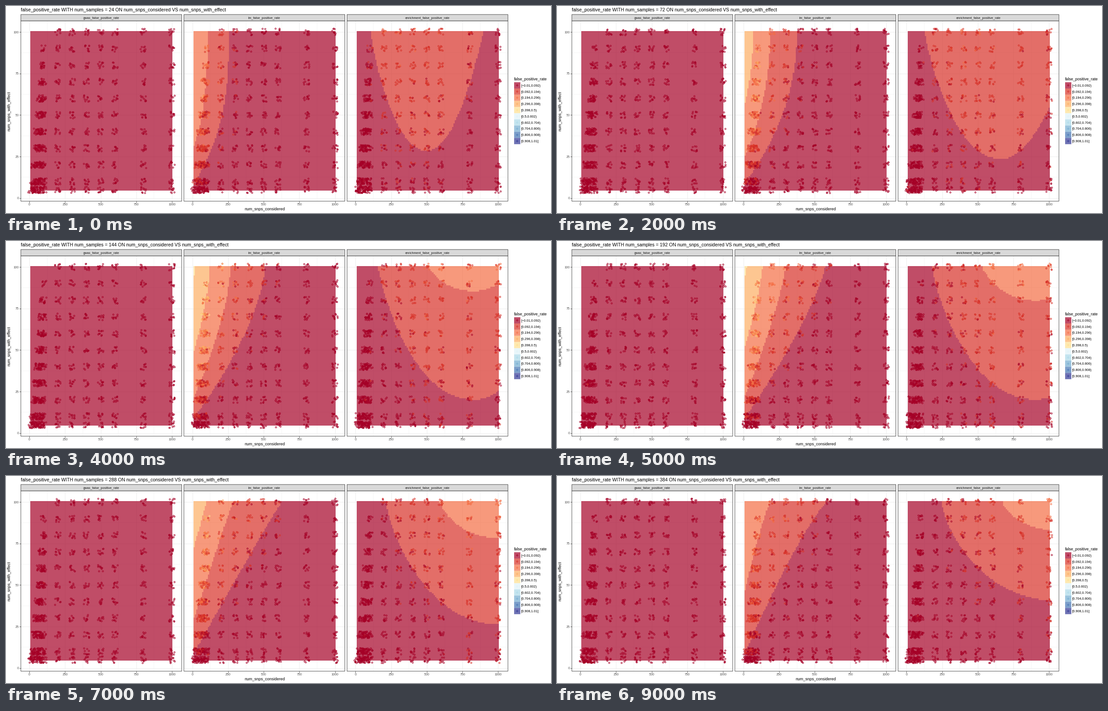
A matplotlib script for the animation above (10 s loop, 1212 by 462 pixels).

```python
import numpy as np
import matplotlib.pyplot as plt
from matplotlib.animation import FuncAnimation
from matplotlib.patches import Rectangle

W, H, DPI = 1212, 462, 100
PX = 72 / DPI
SAMPLES = (24, 48, 72, *range(96, 385, 48))
PANELS = ("gwas_false_positive_rate", "lm_false_positive_rate",
          "enrichment_false_positive_rate")
OFFSETS = 362.7 * np.arange(3)
COLORS = ("#A50026", "#D73027", "#F46D43", "#FDAE61", "#FEE090",
          "#E0F3F8", "#ABD9E9", "#74ADD1", "#4575B4", "#313695")
RGB = np.array([[int(c[i:i + 2], 16) / 255 for i in (1, 3, 5)] for c in COLORS])
BREAKS = -.01 + .102 * np.arange(11)
LEFT, RIGHT, TOP, BOTTOM, CELLS = 54.3, 369.5, 56.5, 412, 100


def px(v):
    return 52 + .317 * np.asarray(v)


def py(v):
    return 428.7 - 3.707 * np.asarray(v)


def hill(n, height, center, bend):
    return height - bend * (n - center) ** 2


def lm_edges(y, n):
    """Right edge of each level, highest rate first, at stage height y."""
    power = .65 + 2.5 * np.exp(-n / 140)
    sizes = ((hill(n, 5.5, 175, .0013), hill(n, 28, 150, .0045)),
             (hill(n, 40, 200, .0013), hill(n, 193, 150, .0045)),
             (hill(n, 93, 230, .00146), hill(n, 295, 160, .0018)),
             (hill(n, 197, 300, .00156), 340))
    v = np.maximum(y - TOP, 0)
    return np.array([417 + max(width, 0) * (1 - (v / max(drop, 28)) ** power)
                     for width, drop in sizes])


def bowl(x, n, start, deep):
    """Lower rim of a bowl that hangs from the top edge."""
    bottom = 1140 - 235 * np.exp(-n / 170)
    w = np.maximum(x - start, 0) / (bottom - start)
    side = np.where(w < 1, w ** (.87 - .00035 * n), w)
    return TOP + deep * (1 - (1 - side) ** 2) - 5 * np.maximum(start - x, 0)


def bowl_depths(x, y, n):
    """How far a place lies inside the outer and inner bowl."""
    outer = bowl(x, n, 807 + .15 * n - .00007 * n * n, hill(n, 299, 165, .0016))
    late = max(n - 110, 0)
    inner = bowl(x, n, 930 + .0004 * n * n, late ** .5 * (10.4 - .0235 * late))
    return np.array((outer - y, inner - y))


def levels(panel, n):
    mid = (np.arange(CELLS) + .5) / CELLS
    x, y = np.meshgrid(LEFT + OFFSETS[panel] + (RIGHT - LEFT) * mid,
                       TOP + (BOTTOM - TOP) * mid)
    if panel == 0:
        return np.zeros(x.shape, int)
    inside = x < lm_edges(y, n) if panel == 1 else bowl_depths(x, y, n) > 0
    return inside.sum(axis=0)


def rates(panel, n, xv, yv, rng):
    noise = rng.normal(size=len(xv))
    x, y = px(xv) + OFFSETS[panel], py(yv)
    if panel == 0:
        small = (xv < 70) & (yv > 15)
        return .025 + .018 * noise + .02 * small * min(1, n / 200)
    if panel == 1:
        edges = np.sort(lm_edges(y, n), axis=0)
        base = np.array([np.interp(p, (*e, e[-1] + 90), (.398, .296, .194, .092, .02))
                         for p, e in zip(x, edges.T)])
        base = np.where(yv < 8, .03, base)
        return base + (.012 + .2 * base) * noise
    outer, inner = bowl_depths(x, y, n)
    peak = min(1000, 200 + 2.2 * n)
    hump = .035 * np.exp(-((xv - peak) / 150) ** 2)
    base = .082 + .0003 * np.clip(outer, -220, 260) + .0008 * np.maximum(inner, 0)
    return base + hump + .028 * noise


fig = plt.figure(figsize=(W / DPI, H / DPI), dpi=DPI, facecolor="white")
ax = fig.add_axes((0, 0, 1, 1))
ax.axis("off")


def text(x, y, s, size, color="black", **kw):
    return ax.text(x, y, s, fontsize=size * PX, color=color,
                   family=["Liberation Sans", "DejaVu Sans"], **kw)


def line(x, y, color, width, z):
    ax.plot(x, y, color=color, lw=width * PX, zorder=z, solid_capstyle="butt")


def box(x, y, w, h, z, **kw):
    ax.add_patch(Rectangle((x, y), w, h, zorder=z, snap=False, **kw))


def rings(x, y, colors):
    return ax.scatter(x, y, s=(3.1 * PX) ** 2, facecolors="none",
                      edgecolors=colors, linewidths=PX, zorder=4)


def number(v):
    return f"{round(v, 3):g}".replace("-", "−")


images, points = [], []
for offset, name in zip(OFFSETS, PANELS):
    left, width = 33 + offset, 357.8
    for v in range(0, 1001, 125):
        major = v % 250 == 0
        x = px(v) + offset
        line((x, x), (33, 436), "#EBEBEB", .85 if major else .45, 1)
        if major:
            line((x, x), (436, 439), "#333333", .85, 5)
            text(x, 445.2, str(v), 7.1, "#4D4D4D", ha="center")
    for v in np.arange(0, 101, 12.5):
        line((left, left + width), (py(v), py(v)), "#EBEBEB",
             .85 if v % 25 == 0 else .45, 1)
    edge = dict(ec="#333333", lw=.85 * PX)
    box(left, 33.2, width, 402.5, 5, fc="none", **edge)
    box(left, 19, width, 14.2, 5, fc="#D9D9D9", **edge)
    text(left + width / 2, 29.2, name, 7.1, "#1A1A1A", ha="center", zorder=6)
    images.append(ax.imshow(np.zeros((CELLS, CELLS, 4)), aspect="auto", zorder=2,
                            interpolation="nearest",
                            extent=(LEFT + offset, RIGHT + offset, BOTTOM, TOP)))
    points.append(rings([], [], []))

for v in range(0, 101, 25):
    line((30.3, 33), (py(v), py(v)), "#333333", .85, 5)
    text(28.6, py(v) + 2.6, str(v), 7.1, "#4D4D4D", ha="right")

title = text(33, 12, "", 10.4)
text(575, 455.7, "num_snps_considered", 8.85, ha="center")
text(11.5, 234.5, "num_snps_with_effect", 8.85, ha="right", va="center", rotation=90)

text(1130, 166.3, "false_positive_rate", 8.8)
for i, color in enumerate(COLORS):
    y = 170.2 + 13.82 * i
    box(1130, y, 13.8, 13.82, 2, fc=color, alpha=.7, lw=0)
    rings([1136.9], [y + 6.9], color)
    close = "]" if i == len(COLORS) - 1 else ")"
    text(1145.5, y + 9.5, f"[{number(BREAKS[i])},{number(BREAKS[i + 1])}{close}", 7.35)

ax.set_xlim(0, W)
ax.set_ylim(H, 0)
ax.set_autoscale_on(False)

# Every pair with fewer effects than considered, ten repeats each.
CONSIDERED = (*range(10, 101, 10), *range(200, 601, 100), 800, 1000)
EFFECTS = (5, *range(10, 101, 10))
PAIRS = np.repeat([(c, e) for c in CONSIDERED for e in EFFECTS if e < c], 10, axis=0)
XV, YV = PAIRS.T


def draw(i):
    n = SAMPLES[i]
    rng = np.random.default_rng(100 + i)
    title.set_text(f"false_positive_rate WITH num_samples = {n} "
                   "ON num_snps_considered VS num_snps_with_effect")
    for p, offset in enumerate(OFFSETS):
        fill = RGB[levels(p, n)]
        images[p].set_data(np.dstack((fill, np.full((CELLS, CELLS), .7))))
        jitter = rng.uniform(-1, 1, (2, len(XV)))
        points[p].set_offsets(np.column_stack((px(XV + 20 * jitter[0]) + offset,
                                               py(YV + 2 * jitter[1]))))
        points[p].set_edgecolors(
            RGB[np.digitize(rates(p, n, XV, YV, rng), BREAKS[1:-1])])
    return []


anim = FuncAnimation(fig, draw, frames=len(SAMPLES), interval=1000,
                     repeat=True, repeat_delay=0, blit=False)
plt.show()
```
